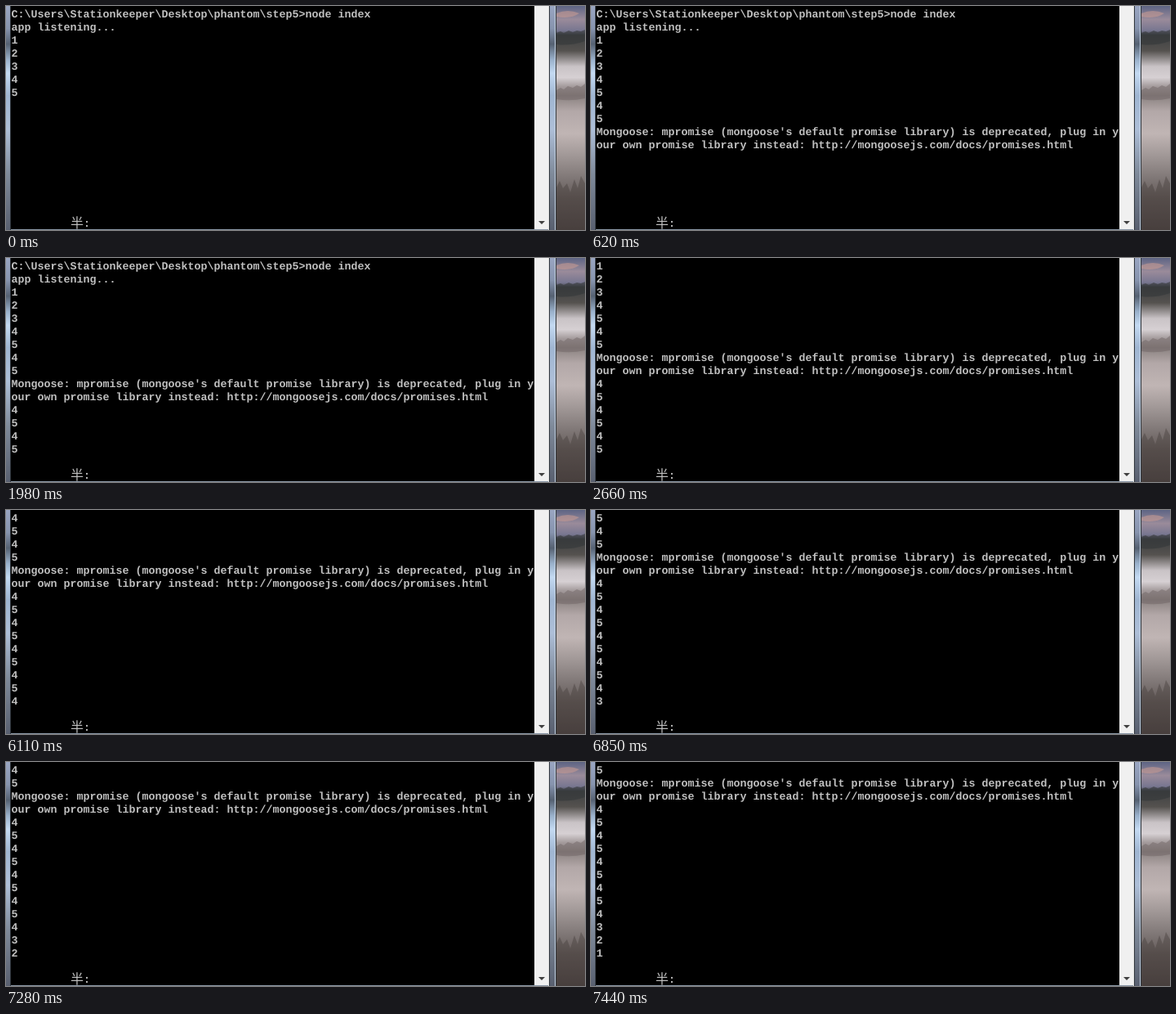
These frames come from a looping animation (709x274 px, 8000 ms). An HTML page:

```html
<!DOCTYPE html>
<html lang="en">
<head>
<meta charset="utf-8">
<style>
  html, body { margin: 0; width: 100%; height: 100%; overflow: hidden; background: #000; }
  svg { display: block; }
  text { fill: #c0c0c0; }
  #lines, .colon {
    font: bold 13.333px "Liberation Mono", monospace;
    text-rendering: geometricPrecision;
  }
  .ime { font: 300 16px "Noto Sans CJK SC", "Noto Sans CJK", sans-serif; }
</style>
</head>
<body>
<svg width="709" height="274" viewBox="0 0 709 274">
  <defs>
    <linearGradient id="forest" x2="0" y2="1">
      <stop offset="0" stop-color="#5d6484"/>
      <stop offset=".06" stop-color="#9a8b9a"/>
      <stop offset=".11" stop-color="#777690"/>
      <stop offset=".13" stop-color="#3e4042"/>
      <stop offset=".2" stop-color="#55524f"/>
      <stop offset=".235" stop-color="#8f8a8a"/>
      <stop offset=".27" stop-color="#c9c3c6"/>
      <stop offset=".32" stop-color="#d6d0d3"/>
      <stop offset=".36" stop-color="#a39a9b"/>
      <stop offset=".4" stop-color="#8a8180"/>
      <stop offset=".47" stop-color="#b3a8a8"/>
      <stop offset=".57" stop-color="#c0b5b4"/>
      <stop offset=".66" stop-color="#a39a99"/>
      <stop offset=".76" stop-color="#827a79"/>
      <stop offset=".86" stop-color="#625957"/>
      <stop offset="1" stop-color="#4b4241"/>
    </linearGradient>
    <linearGradient id="glass" x2="0" y2="1">
      <stop offset="0" stop-color="#9aa6c2"/>
      <stop offset=".1" stop-color="#8794ae"/>
      <stop offset=".17" stop-color="#566273"/>
      <stop offset=".24" stop-color="#9bb2cc"/>
      <stop offset=".3" stop-color="#c4daf2"/>
      <stop offset=".4" stop-color="#a0b6d2"/>
      <stop offset=".55" stop-color="#aebfd8"/>
      <stop offset=".75" stop-color="#7f8a9a"/>
      <stop offset="1" stop-color="#596070"/>
    </linearGradient>
  </defs>

  <rect width="5" height="274" fill="url(#glass)"/>
  <rect x="5" width="1" height="274" fill="#30363d"/>
  <rect x="6" width="641" height="274"/>
  <rect x="6" y="273" width="658" height="1" fill="#8a97a6"/>

  <rect x="647" width="17" height="273" fill="#f0f0f0"/>
  <path d="M652 263h8l-4 4z" fill="#404040"/>
  <rect x="664" width="1" height="274" fill="#e3e3e3"/>
  <rect x="665" width="1" height="274" fill="#30363d"/>
  <rect x="666" width="6" height="274" fill="url(#glass)"/>
  <rect x="672" width="1" height="274" fill="#c3d0e0"/>
  <rect x="673" width="1" height="274" fill="#30363d"/>

  <rect x="674" width="35" height="274" fill="url(#forest)"/>
  <path d="M674 9q14 -6 28 0q-10 7 -28 4z" fill="#c59a92" opacity=".6"/>
  <path d="M674 33l5-2 4 2 6-3 5 2 5-2 5 1 5-2v14q-18 6-35 4z" fill="#35383a" opacity=".6"/>
  <path d="M674 103l5-3 4 2 5-4 6 2 5-3 5 2 5-4v18q-18 4-35 1z" fill="#6a6160" opacity=".45"/>
  <path d="M674 222l4-8 4 9 5-6 4 11 5-16 4 11 4-15 5 9v57h-35z" fill="#433a39" opacity=".4"/>

  <g id="lines"></g>
  <text class="ime" x="79" y="271">半</text>
  <text class="colon" x="95" y="270">:</text>
</svg>

<script>
const ROWS = 15, ROW_HEIGHT = 16, LOOP = 8000;

const output = [
  "C:\\Users\\Stationkeeper\\Desktop\\phantom\\step5>node index",
  "app listening...",
  ..."1234545",
  "Mongoose: mpromise (mongoose's default promise library) is deprecated, plug in y",
  "our own promise library instead: http://mongoosejs.com/docs/promises.html",
  ..."454545454321"
];

// [time in ms, number of lines printed so far]
const prints = [
  [0, 7], [500, 9], [620, 11], [1830, 13], [1980, 15], [2660, 17],
  [3340, 19], [6110, 20], [6850, 21], [7280, 22], [7440, 23]
];

const group = document.getElementById("lines");
const rows = Array.from({ length: ROWS }, (_, i) => {
  const row = document.createElementNS("http://www.w3.org/2000/svg", "text");
  row.setAttribute("x", 6.5);
  row.setAttribute("y", 14 + i * ROW_HEIGHT);
  return group.appendChild(row);
});

let shown = 0;

function draw() {
  const time = performance.now() % LOOP;
  const printed = prints.findLast(([start]) => start <= time)[1];
  if (printed !== shown) {
    const visible = output.slice(Math.max(0, printed - ROWS), printed);
    rows.forEach((row, i) => { row.textContent = visible[i] ?? ""; });
    shown = printed;
  }
  requestAnimationFrame(draw);
}
draw();
</script>
</body>
</html>
```
